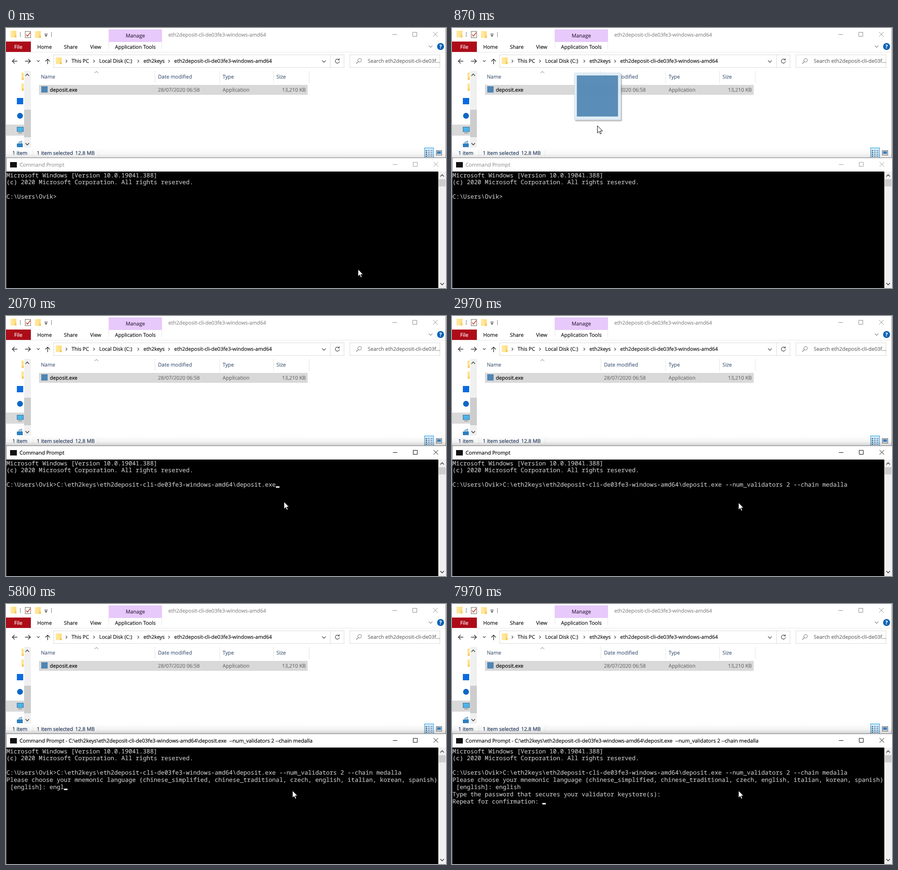
An HTML page for the animation above (8 s loop, 973 px wide and 576 px high).

```html
<!DOCTYPE html>
<html lang="en">
<head>
<meta charset="utf-8">
<title>Command Prompt</title>
<style>
html, body { margin: 0; width: 100%; height: 100%; overflow: hidden; background: #fff; }
svg { display: block; width: 100%; height: 100%; }
text { font: 11.4px "Open Sans", "Noto Sans", sans-serif; white-space: pre; text-rendering: geometricPrecision; stroke-width: .2px; }
#title { font-size: 11.48px; }
#console text { font: 13.24px "Noto Sans Mono", "DejaVu Sans Mono", monospace; fill: #ccc; stroke: #ccc; stroke-width: .12px; }
</style>
</head>
<body>
<svg id="stage" viewBox="0 0 973 576" xmlns="http://www.w3.org/2000/svg"></svg>
<script>
const LOOP = 8000, CELL = 7.944, LINE = 15.89, TOP = 318;
const FOLDER = "eth2deposit-cli-de03fe3-windows-amd64";
const PROMPT = "C:\\Users\\Ovik>";
const PROGRAM = "C:\\eth2keys\\" + FOLDER + "\\deposit.exe";
const ARGS = " --num_validators 2 --chain medalla";

// Markup helpers
const rect = (x, y, w, h, fill, more = "") =>
  `<rect x="${x}" y="${y}" width="${w}" height="${h}" fill="${fill}" ${more}/>`;
const frame = (x, y, w, h, color, fill = "none") =>
  rect(x + .5, y + .5, w - 1, h - 1, fill, `stroke="${color}"`);
const path = (d, color, width = 1, fill = "none") =>
  `<path d="${d}" fill="${fill}" stroke="${color}" stroke-width="${width}"/>`;
const circle = (x, y, r, fill) => `<circle cx="${x}" cy="${y}" r="${r}" fill="${fill}"/>`;
const label = (x, y, s, fill = "#111", more = "") =>
  `<text x="${x}" y="${y}" fill="${fill}" stroke="${fill}" ${more}>${s}</text>`;
const chevron = (x, y, dx, dy, color = "#555", width = 1.3) => path(dx
  ? `M${x - dx / 2} ${y - Math.abs(dx)}l${dx} ${Math.abs(dx)}l${-dx} ${Math.abs(dx)}`
  : `M${x - Math.abs(dy)} ${y - dy / 2}l${Math.abs(dy)} ${dy}l${Math.abs(dy)} ${-dy}`, color, width);
const folder = (x, y, w = 13, h = 15) =>
  rect(x, y, w, h, "#ffdf82") + rect(x, y, w * .55, h, "#ffe79d") +
  rect(x + w - 3, y + h - 5, 3, 5, "#f2c34f");
const buttons = y =>
  path(`M854.5 ${y + .5}h10M899.5 ${y - 4.5}h9v9h-9zM944.5 ${y - 5}l10 10m0 -10l-10 10`, "currentColor");

function ribbon() {
  return folder(10, 6) + folder(64, 7) +
    path("M31.5 9v11M100.5 9v11", "#777") +
    frame(42, 7, 13, 15, "#666", "#fff") + path("M44.5 14.5l3 3.5l6 -8", "#d3492c", 1.8) +
    path("M85 13.5h7", "#222", 1.2) + path("M85.5 16h6l-3 3z", "none", 0, "#222") +
    rect(227, 3, 118, 28, "#e8c9fb") +
    path("M227.5 31v16M344.5 31v16", "#e6e6e6") +
    label(286, 21, "Manage", "#3b2a45", 'text-anchor="middle"') +
    label(359, 19, FOLDER, "#8c8c8c") +
    `<g color="#888">${buttons(14)}</g>` +
    rect(0, 30, 55, 23, "#ad0c19") + label(18, 46, "File", "#fff") +
    label(69, 46, "Home") + label(128, 46, "Share") + label(186, 46, "View") +
    label(241, 46, "Application Tools") +
    chevron(939, 41, 0, 4, "#888", 1.1) +
    circle(961, 41, 7.7, "#0a62b4") +
    label(961, 45.3, "?", "#fff", 'text-anchor="middle" style="font-weight:700"') +
    path("M0 53.5h973", "#e6e6e6");
}

function addressBar() {
  const crumbs = [[145, "This PC"], [206, "Local Disk (C:)"], [304, "eth2keys"], [372, FOLDER]];
  return path("M25 73.5h-11m5 -5l-5 5l5 5", "#333", 1.4) +
    path("M42 73.5h12m-5 -5l5 5l-5 5", "#333", 1.4) +
    chevron(71.5, 73, 0, 3, "#555") +
    path("M92 80v-11m-5 5l5 -5l5 5", "#333", 1.4) +
    frame(105, 59, 643, 29, "#d9d9d9") + path("M717.5 59v29", "#d9d9d9") +
    folder(110, 65) +
    crumbs.map(([x, s]) => chevron(x - 11.5, 73.5, 3, 0) + label(x, 77, s)).join("") +
    chevron(703, 74, 0, 4, "#555", 1.4) +
    path("M736 70.2a4.5 4.5 0 1 0 1.3 3.8M737 67.5v3.5h-3.5", "#444", 1.2) +
    frame(760, 59, 200, 29, "#d9d9d9") +
    `<circle cx="782" cy="71.5" r="4" fill="none" stroke="#777"/>` + path("M779 74.5l-4.5 4.5", "#777", 1.2) +
    label(800, 77, "Search eth2deposit-cli-de03f...", "#6d6d6d");
}

function sidePane() {
  return folder(34, 99, 5, 16) + folder(34, 123, 5, 16) +
    rect(24, 155, 14, 14, "#0b6be0") +
    circle(31, 194.5, 6.5, "#0c68c4") +
    rect(0, 214, 40, 24.5, "#d9d9d9") +
    frame(24, 219, 15, 11, "#3c6f96", "#4cb4ea") + path("M27 232.5h9", "#4a6b82") +
    path("M28 258v-5l7 -3v9", "#6b90aa", 1, "#a9d0ea") + rect(24, 256, 13, 8, "#2e7fc0") +
    rect(40, 95, 15, 170, "#f0f0f0") + rect(40, 181, 15, 61, "#cdcdcd") +
    chevron(47, 104, 0, -4, "#444", 1.6) + chevron(47, 257, 0, 4, "#444", 1.6);
}

function fileList() {
  const heads = [[77, "Name"], [336, "Date modified"], [479, "Type"], [598, "Size"]];
  return heads.map(([x, s]) => label(x, 112, s, "#4a5f7d")).join("") +
    path("M329.5 95v27M472.5 95v27M591.5 95v27M670.5 95v27", "#e3e3e3") +
    chevron(200, 98, 0, -4, "#777", 1) +
    `<rect id="row" x="73.5" y="126.5" width="593" height="21"/>` +
    rect(78, 129, 14, 14, "#4f86b4") +
    label(97, 141, "deposit.exe", "#000") +
    label(336, 141, "28/07/2020 06:58", "#6f6f6f") + label(479, 141, "Application", "#6f6f6f") +
    label(663, 141, "13,210 KB", "#6f6f6f", 'text-anchor="end"');
}

function statusBar() {
  const ink = "#1d3557";
  let s = label(14, 281, "1 item", ink) + label(68, 281, "1 item selected", ink) +
    label(153, 281, "12.8 MB", ink) + path("M59.5 270v14M205.5 270v14", "#f0f0f0") +
    frame(925, 265, 21, 23, "#2d9fd8", "#cce8ff");
  for (let y = 271; y < 284; y += 4)
    s += rect(928, y, 3, 2, "#456") + rect(933, y, 4, 1.2, "#678") + rect(939, y, 4, 1.2, "#678");
  return s + frame(951, 271, 13, 11, "#555", "#fff") + rect(953, 273, 9, 6, "#3d86c6") +
    path("M972.5 0v288", "#8a8a8a");
}

function consoleWindow() {
  let rows = "";
  for (let i = 0; i < 8; i++) rows += `<text class="line" x="1" y="${330.6 + i * LINE}"></text>`;
  return `<linearGradient id="fade" x2="0" y2="1"><stop stop-opacity="0"/>
    <stop offset=".6" stop-opacity=".05"/><stop offset="1" stop-opacity=".18"/></linearGradient>` +
    rect(0, 266, 973, 21, "url(#fade)", 'id="shadow"') +
    rect(0, 287, 973, 289, "#fff") + path("M0 287.5h973", "#777") +
    rect(9, 297, 15, 12, "#111") +
    label(30, 307, "", "#000", 'id="title"') +
    `<g id="buttons" transform="translate(1 288)">${buttons(14)}</g>` +
    rect(0, TOP, 956, 258, "#000") +
    rect(956, TOP, 17, 258, "#f0f0f0") + rect(957, 335, 15, 16, "#cdcdcd") +
    chevron(964.5, 327, 0, -4, "#444", 1.6) + chevron(964.5, 567, 0, 4, "#444", 1.6) +
    path("M.5 288v288", "#777") +
    `<g id="console">${rows}</g><rect id="caret" width="${CELL}" height="3.2" fill="#f2f2f2"/>`;
}

const ghost = `<g id="ghost">
  ${rect(-49, -115, 104, 106, "#000", 'rx="3" opacity=".22"')}
  ${rect(-50.5, -116.5, 103, 104, "#e6f3fb", 'rx="2" opacity=".88" stroke="#b9d6e8"')}
  ${rect(-45, -111, 91, 91, "#4f86b4", 'opacity=".92"')}</g>`;
const pointer = path("M.5 .5v16l3.7 -3.6l2.5 5.8l2.5 -1.1l-2.5 -5.6h5z", "#000", 1, "#fff");

const stage = document.getElementById("stage");
stage.innerHTML = rect(0, 0, 973, 576, "#fff") + ribbon() + addressBar() + sidePane() +
  fileList() + statusBar() + consoleWindow() + `<g id="mouse">${ghost}${pointer}</g>`;

const $ = id => document.getElementById(id);
const [row, title, ctrl, caret, drag, mouse, shadow] =
  ["row", "title", "buttons", "caret", "ghost", "mouse", "shadow"].map($);
const lines = [...document.querySelectorAll(".line")];

// time, x, y of the pointer
const moves = [
  [30, 778, 534], [420, 340, 123], [530, 323, 134], [770, 323, 134], [800, 322, 177],
  [870, 321, 216], [1380, 484, 418], [1560, 484, 418], [2100, 615, 411], [2250, 615, 411], [2470, 633, 413]
];
// time, row, column, visible
const carets = [
  [0, 3, 14, 0], [1380, 3, 75, 0], [1900, 3, 75, 1], [2430, 3, 75, 0], [2700, 3, 110, 1], [2970, 3, 110, 0],
  [3230, 4, 0, 1], [3500, 4, 0, 0], [4030, 4, 0, 1], [4570, 4, 0, 0], [4670, 5, 12, 1],
  [5370, 5, 13, 1], [5570, 5, 14, 1], [5700, 5, 15, 1], [5800, 5, 16, 1], [6000, 5, 17, 1],
  [6130, 5, 17, 0], [6370, 5, 18, 1], [6430, 5, 19, 1], [6700, 5, 19, 0],
  [6730, 6, 59, 1], [7730, 6, 59, 0], [7970, 7, 25, 1]
];
const DRAG = 800, DROP = 1380, PASTE = 2700, ENTER = 3200;

function pointerAt(t) {
  const i = moves.findIndex(m => m[0] > t);
  if (i < 0) return moves[moves.length - 1].slice(1);
  if (!i) return moves[0].slice(1);
  const [t0, x0, y0] = moves[i - 1], [t1, x1, y1] = moves[i];
  let k = (t - t0) / (t1 - t0);
  if (t1 - t0 > 100) k = k * k * (3 - 2 * k);
  return [x0 + (x1 - x0) * k, y0 + (y1 - y0) * k];
}

function setText(node, s) { if (node.textContent !== s) node.textContent = s; }

function draw(t) {
  const [x, y] = pointerAt(t);
  const dragging = t >= DRAG && t < DROP, active = t >= DROP;
  mouse.setAttribute("transform", `translate(${x.toFixed(1)} ${y.toFixed(1)})`);
  drag.setAttribute("visibility", dragging ? "visible" : "hidden");

  const hover = t < DRAG && x < 667 && y > 122 && y < 148;
  row.setAttribute("fill", hover ? "#cce8ff" : "#d9d9d9");
  row.setAttribute("stroke", hover ? "#99d1ff" : "#d9d9d9");

  const ink = active ? "#000" : "#999";
  title.setAttribute("fill", ink);
  title.setAttribute("stroke", ink);
  ctrl.setAttribute("color", ink);
  shadow.setAttribute("opacity", active ? 1 : .6);
  setText(title, "Command Prompt" + (t >= ENTER ? " - " + PROGRAM + " " + ARGS : ""));

  const [, r, c, on] = carets.filter(k => k[0] <= t).pop();
  caret.setAttribute("x", 1 + c * CELL);
  caret.setAttribute("y", TOP + r * LINE + 11.6);
  caret.setAttribute("visibility", on ? "visible" : "hidden");

  const typed = "english".slice(0, r === 5 ? c - 12 : 7);
  [
    "Microsoft Windows [Version 10.0.19041.388]",
    "(c) 2020 Microsoft Corporation. All rights reserved.",
    "",
    PROMPT + (active ? PROGRAM : "") + (t >= PASTE ? ARGS : ""),
    r > 4 ? "Please choose your mnemonic language (chinese_simplified, chinese_traditional, czech, english, italian, korean, spanish)" : "",
    r > 4 ? " [english]: " + typed : "",
    r > 5 ? "Type the password that secures your validator keystore(s): " : "",
    r > 6 ? "Repeat for confirmation: " : ""
  ].forEach((s, i) => setText(lines[i], s));
}

const start = performance.now();
function tick() {
  // small lead so a step shows on its own display refresh
  draw((performance.now() - start) % LOOP + 6);
  requestAnimationFrame(tick);
}
tick();
</script>
</body>
</html>
```
